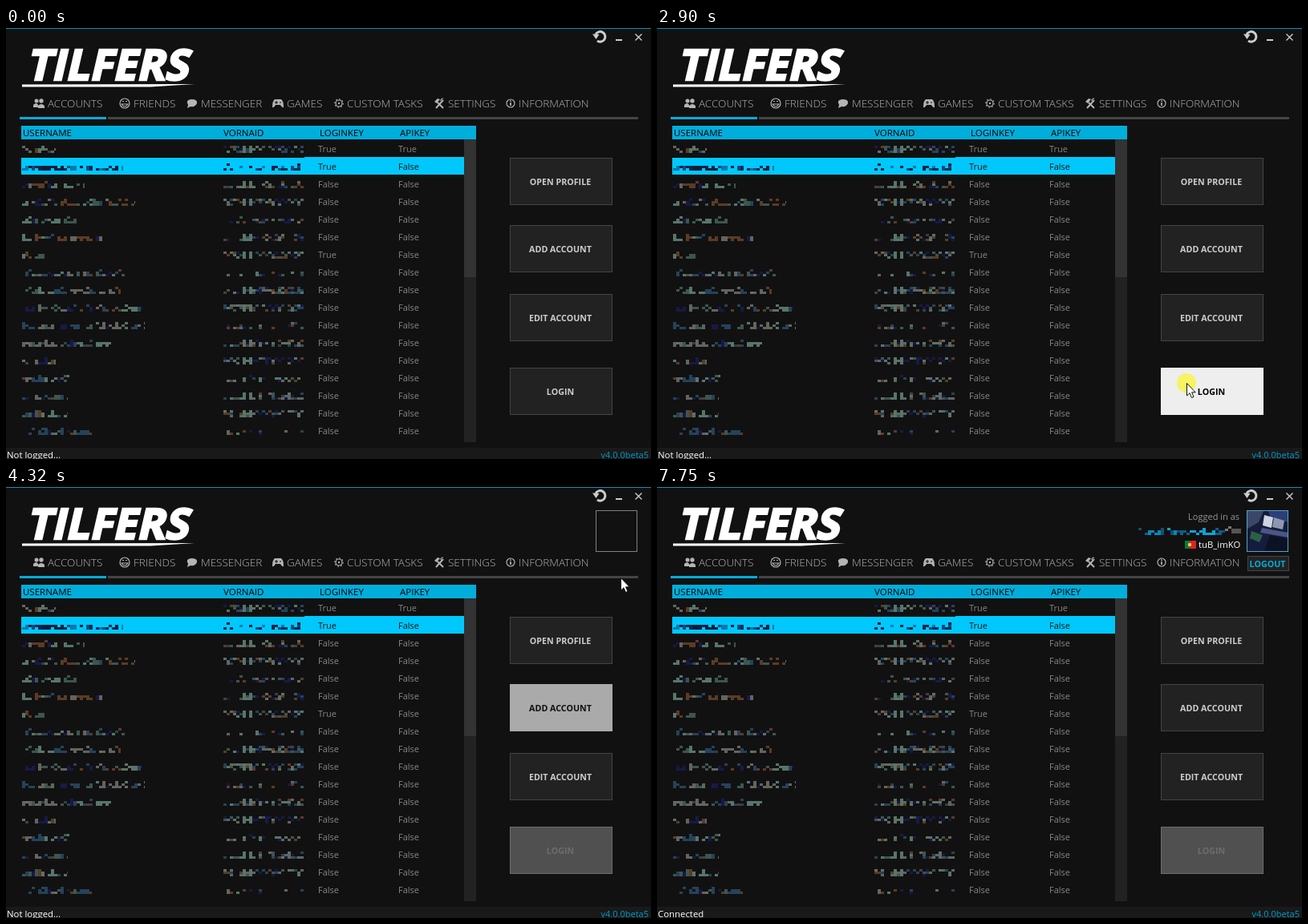
Write an HTML page that moves like this. It is 804 by 538 pixels and loops after 7830 ms.

```html
<!DOCTYPE html>
<html lang="en">
<head>
<meta charset="utf-8">
<title>Account manager</title>
<style>
  html, body { margin: 0; width: 100%; height: 100%; overflow: hidden; background: #111; }
  svg { display: block; width: 100%; height: 100%; }
  text { font-family: "Open Sans", "Noto Sans", sans-serif; font-size: 11px; white-space: pre; }
  .tab { font-size: 13.5px; font-weight: 300; fill: #b4b4b4; }
  .head { font-size: 11.5px; fill: #000; }
  .cell { fill: #868686; }
  .btn text { font-size: 10.7px; font-weight: 700; text-anchor: middle; }
  .status { font-size: 11.4px; fill: #fff; }
  .ico { fill: none; stroke: #b4b4b4; stroke-width: 1.2; }
  .solid { fill: #b4b4b4; stroke: none; }
</style>
</head>
<body>
<svg id="stage" viewBox="0 0 804 538"></svg>
<script>
const LOOP = 7830, STEP = 80, BLUE = '#00aedb';
const stage = document.getElementById('stage');

const rect = (x, y, w, h, fill, more = '') =>
  `<rect x="${x}" y="${y}" width="${w}" height="${h}" fill="${fill}" ${more}/>`;
const text = (x, y, s, cls = '', more = '') =>
  `<text x="${x}" y="${y}" class="${cls}" ${more}>${s}</text>`;
const path = (d, more = '') => `<path d="${d}" ${more}/>`;
const group = (id, body, more = '') => `<g id="${id}" ${more}>${body}</g>`;

function random(seed) {
  return () => {
    seed = (seed * 1664525 + 1013904223) >>> 0;
    return seed / 4294967296;
  };
}

const MUTED = ['#58756a', '#17194a', '#5c3b26', '#26425a', '#64645f', '#3c564f'];
const ON_BLUE = ['#06264f', '#0a4a7c', '#0b1c3a', '#0079ac'];
const BLUES = ['#0a86b8', '#0b5f88', '#0fa2d6', '#12506e'];
const GREYS = ['#777', '#555'];

// Pixelated word: colour drifts along the word, low cells are denser.
function mosaic(x0, x1, y, colours, seed, odds = [.13, .5, .62]) {
  const rnd = random(seed * 7919 + 17);
  let out = '', tone = 0;
  for (let x = x0; x < x1; x += 4) {
    if (rnd() < .6) tone = Math.floor(rnd() * colours.length);
    odds.forEach((p, k) => {
      if (rnd() < p) out += rect(x, y - 4 + k * 3, Math.min(4, x1 - x), 3, colours[tone]);
    });
  }
  return out;
}

// Pixelated number: three looks repeat down the column.
function idMosaic(y, row, colours) {
  const rnd = random(row * 104729 + 5), look = row % 3;
  let out = '';
  for (let c = 0; c < 25; c++) {
    const x = 271 + c * 4, bar = look !== 1 && (c === 6 || c === 8);
    const odds = bar ? [1, 1, 1]
      : look === 0 ? [c % 2 ? .15 : .95, c % 2 ? .75 : .2, .25]
      : look === 1 ? [.03, .35, .4]
      : [c > 9 ? .3 : .03, c > 5 ? .5 : .1, .65];
    for (let k = 0; k < 3; k++) {
      const tone = bar ? 0 : Math.floor(rnd() * colours.length);
      if (rnd() < odds[k]) out += rect(x, y - 4 + k * 3, 4, 3, colours[tone]);
    }
  }
  return out;
}

function table() {
  const ends = [62, 146, 98, 161, 89, 122, 50, 148, 143, 170, 173, 131, 62, 79, 77, 77, 107];
  let out = rect(19, 122, 567, 17, BLUE) + rect(571, 139, 15, 378, '#222') + rect(571, 139, 15, 172, '#333') +
    rect(19, 162, 353, 21, '#00c8fd') + rect(372, 161, 199, 22, '#00c8fd');
  [['USERNAME', 21], ['VORNAID', 271], ['LOGINKEY', 391], ['APIKEY', 491]]
    .forEach(([s, x]) => out += text(x, 135, s, 'head'));
  ends.forEach((end, i) => {
    const y = 151 + i * 22, chosen = i === 1, colours = chosen ? ON_BLUE : MUTED;
    const dark = chosen ? 'style="fill:#111"' : '';
    out += mosaic(20, end, y, colours, i + 3, chosen ? [.05, .6, .75] : undefined) + idMosaic(y, i, colours);
    out += text(389, y + 4, [0, 1, 6].includes(i) ? 'True' : 'False', 'cell', dark);
    out += text(489, y + 4, i ? 'False' : 'True', 'cell', dark);
  });
  return `<g shape-rendering="crispEdges">${out}</g>`;
}

function tabs() {
  const names = [['ACCOUNTS', 52], ['FRIENDS', 159], ['MESSENGER', 243], ['GAMES', 350],
    ['CUSTOM TASKS', 425], ['SETTINGS', 551], ['INFORMATION', 639]];
  const dot = (x, y, r, cls, more = '') => `<circle cx="${x}" cy="${y}" r="${r}" class="${cls}" ${more}/>`;
  return names.map(([s, x]) => text(x, 99, s, 'tab')).join('') +
    dot(38, 91, 2.5, 'solid') + dot(44, 91, 2.7, 'solid') +
    path('M34 99v-3q4-4 6 0v3zM40 100v-3q4-4 8 0v3z', 'class="solid"') +
    dot(148, 94, 6, 'ico') + path('M144 95q4 6 8 0zM145 91.5h2M149 91.5h2', 'class="ico"') +
    path('M226 100l1-4q-4-6 4-7 8 0 7 5-2 5-8 4z', 'class="solid"') +
    path('M335 89h8q3 2 3 10-2 1-4-3h-6q-2 4-4 3 0-8 3-10z', 'class="solid"') +
    path('M335 93h4M337 91v4M342 92v2', 'stroke="#111"') +
    dot(415, 94, 4, 'ico') + dot(415, 94, 1.2, 'solid') +
    dot(415, 94, 5.2, 'ico', 'stroke-dasharray="1.6 2.4"') +
    path('M536 100l9-10M545 100l-7-7', 'class="ico" style="stroke-width:2"') +
    path('M534 92l4-4 3 1-4 5z', 'class="solid"') + path('M542 91q0-3 3-3', 'class="ico"') +
    dot(629, 94, 5, 'ico') + path('M629 93v4M629 90.5v1.4', 'class="ico" style="stroke-width:1.7"') +
    rect(17, 111, 108, 3, BLUE) + rect(127, 111, 661, 3, '#444');
}

function brand() {
  return text(0, 0, 'TILFERS', '', `transform="translate(25 65) skewX(-13)" fill="#fff" stroke="#fff"
    stroke-width="2.6" style="font-size:53px;font-weight:700"`) + path('M20 70.5L235 70L180 73.5H20z', 'fill="#fff"');
}

function controls() {
  return path('M735 8A6.3 6.3 0 1 1 737 16', 'fill="none" stroke="#ccc" stroke-width="3"') +
    path('M731 7.5l8.5 .5-4 6z', 'fill="#ccc"') + rect(760, 14, 8, 2, '#ccc') +
    path('M784.5 7.5l8 8M792.5 7.5l-8 8', 'stroke="#ccc" stroke-width="1.4"');
}

function photo() {
  return rect(736, 30, 51, 51, '#161c3c') + path('M736 30h20l-6 14-14 8z', 'fill="#3b4769"') +
    path('M762 30h25v14l-22-5z', 'fill="#2c3f77"') + path('M757 35l11 3-2 13-11-3z', 'fill="#cdd5e0"') +
    path('M769 38l13 4-2 11-13-3z', 'fill="#8d98b0"') + path('M754 51l33 6v6l-35-6z', 'fill="#4a5684"') +
    path('M741 55l14 5-4 9-12-5z', 'fill="#2a6148"') + path('M764 60l23 5v16h-30z', 'fill="#0d1124"');
}

function account() {
  return text(726, 41, 'Logged in as', '', 'text-anchor="end" fill="#959595"') +
    `<g shape-rendering="crispEdges">${mosaic(600, 708, 55, BLUES, 71)}${mosaic(708, 728, 53, GREYS, 90, [.7, .5, .6])}</g>` +
    rect(658, 67, 6, 10, '#0a7a3c') + rect(664, 67, 8, 10, '#d8232a') +
    '<circle cx="664" cy="72" r="2.2" fill="#f0d030"/>' +
    text(675, 76, 'tuB_imKO', '', 'fill="#fff" style="font-size:11.3px"') + photo();
}

const buttons = [
  { id: 'open', label: 'OPEN PROFILE', x: 628, y: 162, w: 128, h: 59 },
  { id: 'add', label: 'ADD ACCOUNT', x: 628, y: 246, w: 128, h: 59 },
  { id: 'edit', label: 'EDIT ACCOUNT', x: 628, y: 332, w: 128, h: 59 },
  { id: 'login', label: 'LOGIN', x: 628, y: 424, w: 128, h: 59 },
  { id: 'logout', label: 'LOGOUT', x: 736, y: 86, w: 52, h: 19 }
];
// fill, border, label
const looks = {
  normal: ['#222', '#444', '#ccc'],
  link: ['#222', '#444', BLUE],
  hover: ['#aaa', '#aaa', '#111'],
  press: ['#eee', '#eee', '#000'],
  off: ['#505050', '#6d6d6d', '#6d6d6d']
};
const drawButton = b => group(b.id,
  rect(b.x + .5, b.y + .5, b.w - 1, b.h - 1, '') + text(b.x + b.w / 2 - 1, b.y + b.h / 2 + 4, b.label), 'class="btn"');

stage.innerHTML = rect(0, 0, 804, 538, '#111') + rect(0, 0, 804, 1, '#0092bd') + rect(0, 524, 804, 14, '#191919') +
  brand() + controls() + tabs() + table() + group('account', account()) +
  rect(735.5, 29.5, 51, 51, 'none', 'id="frame"') + buttons.map(drawButton).join('') +
  text(1, 536.5, '', 'status', 'id="status"') +
  text(801, 536.5, 'v4.0.0beta5', '', 'text-anchor="end" fill="#009cc8"') +
  group('cursor',
    '<circle id="click" r="12" fill="#f7f25c" opacity=".95"/>' +
    path('M.5 .5V16L4 12.7L6.5 18.5L9 17.4L6.6 11.8H11.2z', 'id="arrow" fill="#fff" stroke="#111"') +
    path('M3 3.5Q4.5 1 6.5 3.5V7.5L12.5 9Q14 9.7 13.8 13L12 18V21H5V18L.5 13.5Q.5 11.5 3 11.5z',
      'id="hand" fill="#fff" stroke="#111" stroke-width=".8"'));

const el = id => document.getElementById(id);
const show = (id, on) => el(id).setAttribute('display', on ? 'inline' : 'none');

// time, x, y of the pointer
const track = [
  [440, 560, 520], [1160, 111, 172], [1320, 103, 181], [1470, 103, 181], [1550, 102, 183], [1710, 101, 174],
  [1940, 101, 174], [2660, 660, 443], [2900, 660, 443], [2980, 661, 410], [3060, 664, 280], [3140, 671, 199],
  [3220, 694, 156], [3460, 766, 113], [4390, 766, 113], [4870, 766, 100], [4940, 766, 100], [5020, 762, 89],
  [6650, 762, 89], [6730, 766, 111], [6810, 769, 127], [6890, 769, 127]
];

function pointer(t) {
  const i = track.findIndex(k => k[0] > t) - 1;
  if (i < 0) return null;
  const [t0, x0, y0] = track[i], [t1, x1, y1] = track[i + 1];
  let p = Math.floor((t - t0) / STEP) * STEP / (t1 - t0);
  if (t1 - t0 > 600) p = p * p * (3 - 2 * p);
  return { x: Math.round(x0 + (x1 - x0) * p), y: Math.round(y0 + (y1 - y0) * p) };
}

const inside = (p, r) => p && p.x >= r.x && p.x < r.x + r.w && p.y >= r.y && p.y < r.y + r.h;
const grid = { x: 19, y: 122, w: 552, h: 395 };

function look(b, p, t) {
  if (b.id === 'login' && t >= 4320) return 'off';
  if (b.id === 'login' && t >= 2900 && t < 2980) return 'press';
  if (b.id === 'add' && t >= 3060 && t < 7750) return 'hover';
  if (inside(p, b)) return 'hover';
  return b.id === 'logout' ? 'link' : 'normal';
}

function render(t) {
  const p = pointer(t), online = t >= 4470;
  for (const b of buttons) {
    const [fill, stroke, ink] = looks[look(b, p, t)], [box, label] = el(b.id).children;
    box.setAttribute('fill', fill);
    box.setAttribute('stroke', stroke);
    label.setAttribute('fill', ink);
  }
  show('account', online);
  show('logout', online);
  show('frame', t >= 4320);
  el('frame').setAttribute('stroke', online ? '#4fa3c8' : '#808080');
  el('status').textContent = online ? 'Connected' : 'Not logged...';
  show('cursor', p);
  if (!p) return;
  const hand = inside(p, grid) || (t >= 5020 && inside(p, buttons[4]));
  show('hand', hand);
  show('arrow', !hand);
  show('click', (t >= 1860 && t < 2020) || (t >= 2900 && t < 2980));
  el('cursor').setAttribute('transform', `translate(${p.x} ${p.y})`);
}

const start = performance.now();
function tick() {
  render((performance.now() - start) % LOOP);
  requestAnimationFrame(tick);
}
tick();
</script>
</body>
</html>
```
